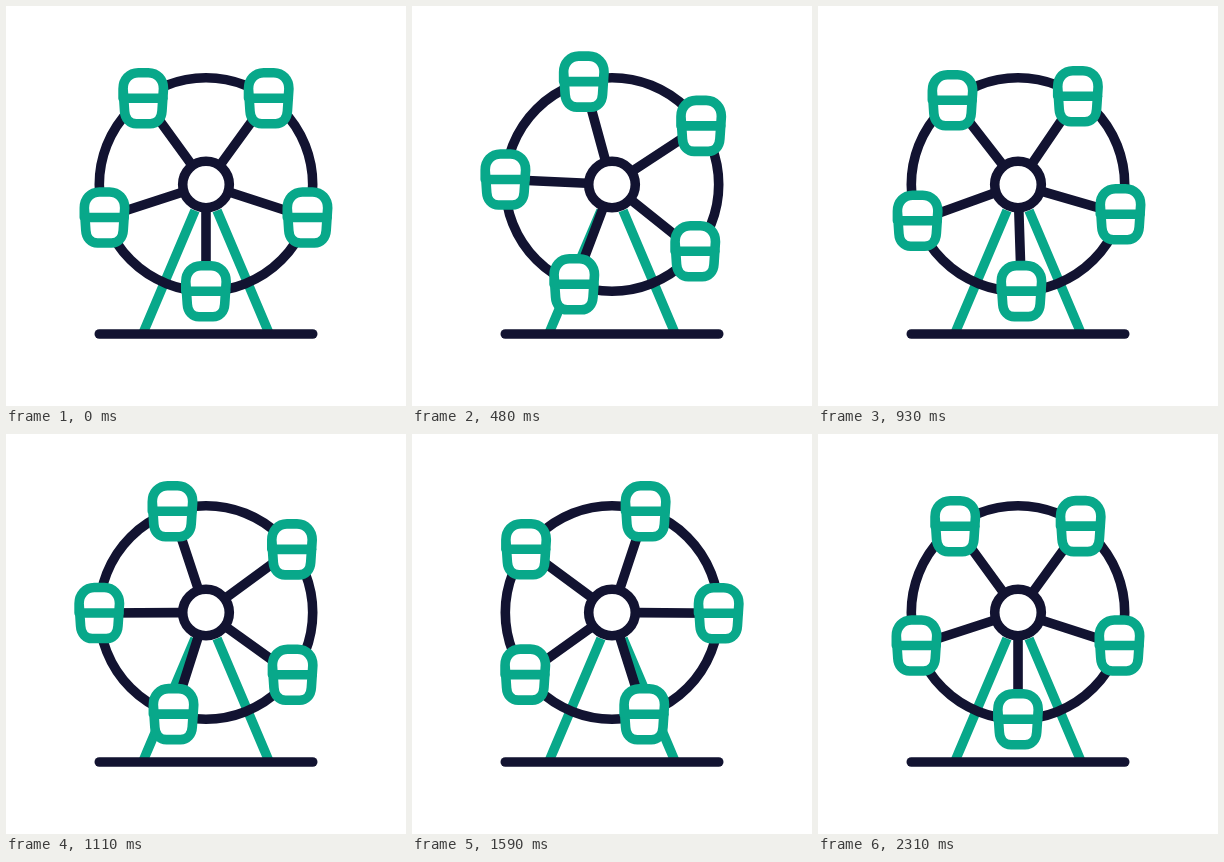
An HTML page for the animation above (2340 ms loop, 400 by 400 pixels).

```html
<!DOCTYPE html>
<html lang="en">
<head>
<meta charset="utf-8">
<title>Ferris wheel</title>
<style>
  html, body { margin: 0; height: 100%; overflow: hidden; background: #fff; }
  svg { display: block; width: 100vw; height: 100vh; }
  .dark, .green { fill: none; stroke-width: 9.6; stroke-linecap: round; stroke-linejoin: round; }
  .dark { stroke: #121331; }
  .green { stroke: #08a88a; }
  .solid { fill: #fff; }
</style>
</head>
<body>
<svg viewBox="0 0 400 400">
  <defs>
    <g id="cabin" class="green">
      <path class="solid" d="M-20.2 0V-9.5C-20.2-18.500-14-25.500-5-25.500H5C14-25.500 20.200-18.500 20.200-9.500L18.700 13C18.300 20.500 13.500 25.500 7 25.500H-7C-13.500 25.500-18.300 20.500-18.700 13L-20.200-9.500"/>
      <path d="M-19.500 0H19.500"/>
    </g>
  </defs>
  <path class="green" style="stroke-linecap:butt" d="M189 204.500L137.500 326M211 204.500L262.500 326"/>
  <path class="dark" d="M93.300 328H306.700"/>
  <circle class="dark" cx="200" cy="178.500" r="106.700"/>
  <path id="spokes" class="dark"/>
  <circle class="dark solid" cx="200" cy="178.500" r="23.300"/>
  <g id="cabins"></g>
</svg>
<script>
const LOOP = 2340, COUNT = 5, RADIUS = 106.7, CX = 200, CY = 178.5;
const STEP = 2 * Math.PI / COUNT;
const spokes = document.getElementById('spokes');
const holder = document.getElementById('cabins');
const cabins = Array.from({ length: COUNT }, () => {
  const cabin = document.createElementNS('http://www.w3.org/2000/svg', 'use');
  cabin.setAttribute('href', '#cabin');
  return holder.appendChild(cabin);
});

// cubic-bezier(x1, 0, x2, 1), solved by bisection
function ease(x, x1 = 0.333, x2 = 0.413) {
  let low = 0, high = 1, s;
  for (let i = 0; i < 30; i++) {
    s = (low + high) / 2;
    const u = 1 - s;
    if (3 * x1 * s * u * u + 3 * x2 * s * s * u + s ** 3 < x) low = s;
    else high = s;
  }
  return s * s * (3 - 2 * s);
}

function draw(now) {
  // Two cabin spacings per loop bring the wheel back to the same look.
  const turn = 2 * STEP * ease((now % LOOP) / LOOP);
  let path = '';
  cabins.forEach((cabin, i) => {
    const angle = Math.PI / 2 + turn + i * STEP;
    const at = r => `${CX + r * Math.cos(angle)} ${CY + r * Math.sin(angle)}`;
    path += `M${at(25)}L${at(RADIUS)}`;
    cabin.setAttribute('transform', `translate(${at(RADIUS)})`);
  });
  spokes.setAttribute('d', path);
}

const start = performance.now();
function tick() {
  draw(performance.now() - start);
  requestAnimationFrame(tick);
}
tick();
</script>
</body>
</html>
```
